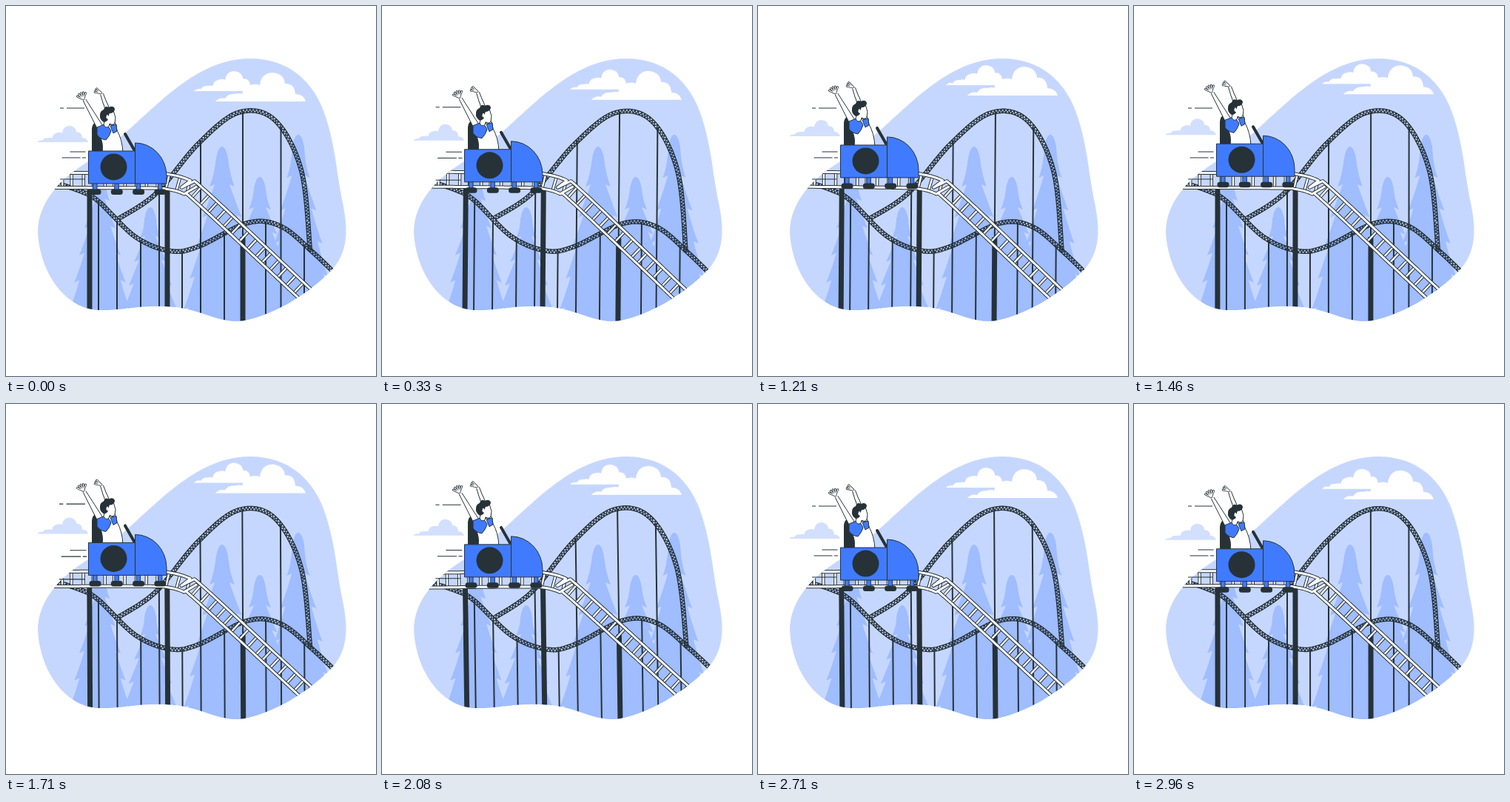
Recreate the animation shown at these times as an HTML page with a canvas. Size 500 by 500 pixels, loop 3 s.

```html
<!DOCTYPE html>
<html lang="en">
<head>
<meta charset="utf-8">
<title>Roller coaster</title>
<style>
html, body { margin: 0; width: 100%; height: 100%; overflow: hidden; background: #fff; }
canvas { display: block; width: 500px; height: 500px; }
</style>
</head>
<body>
<canvas id="stage"></canvas>
<script>
const LOOP = 3000;
const BLUE = '#407bff', PALE = '#c6d7ff', MID = '#9fbdff', MIST = '#d2dfff',
  DARK = '#263238', WHITE = '#fff';

const canvas = document.getElementById('stage');
const ratio = window.devicePixelRatio || 1;
canvas.width = canvas.height = 500 * ratio;
const ctx = canvas.getContext('2d');

function fill(path, color) {
  ctx.fillStyle = color;
  ctx.fill(path);
}

function stroke(path, color, width) {
  ctx.strokeStyle = color;
  ctx.lineWidth = width;
  ctx.stroke(path);
}

function shape(path, color, width = 1) {
  fill(path, color);
  stroke(path, DARK, width);
}

// A light line with a dark edge on both sides.
function tube(path, width, edge) {
  stroke(path, DARK, width + 2 * edge);
  stroke(path, WHITE, width);
}

// Smooth curve through points, resampled at an even step, with normals.
function curve(pts, step) {
  const at = i => pts[Math.max(0, Math.min(pts.length - 1, i))];
  const mix = (a, b, c, d, u) => 0.5 * (2 * b + (c - a) * u +
    (2 * a - 5 * b + 4 * c - d) * u * u + (3 * b - a - 3 * c + d) * u * u * u);
  const out = [];
  let prev = pts[0], left = 0;
  for (let i = 0; i < pts.length - 1; i++) {
    const q = [at(i - 1), at(i), at(i + 1), at(i + 2)];
    for (let k = 1; k <= 60; k++) {
      const p = [0, 1].map(n => mix(q[0][n], q[1][n], q[2][n], q[3][n], k / 60));
      const dx = p[0] - prev[0], dy = p[1] - prev[1], len = Math.hypot(dx, dy);
      left -= len;
      if (left <= 0) {
        out.push({ x: p[0], y: p[1], nx: -dy / len, ny: dx / len });
        left += step;
      }
      prev = p;
    }
  }
  return out;
}

// Path beside a curve; side(i) gives the distance at sample i.
function beside(points, side) {
  const path = new Path2D();
  points.forEach((p, i) => path.lineTo(p.x + p.nx * side(i), p.y + p.ny * side(i)));
  return path;
}

const blob = new Path2D(
  'M330 71C382 71 417 102 432 150C446 194 446 222 455 266C462 300 464 333 438 359' +
  'C410 387 366 416 322 425C284 430 266 408 216 406C178 404 160 411 126 411' +
  'C79 409 46 360 43 306C43 262 78 231 108 212C143 191 174 159 207 130' +
  'C244 98 282 71 330 71Z');

// Tiered tree, widening towards the ground.
function tree(x, top, half, tiers = 5) {
  const path = new Path2D(), height = 410 - top;
  for (const side of [-1, 1]) {
    path.moveTo(x, top);
    path.quadraticCurveTo(x + side * 5, top, x + side * 8, top + 16);
    for (let i = 1; i <= tiers + 1; i++) {
      const d = (i + 0.3) / (tiers + 0.3), w = half * Math.pow(d, 0.8), y = top + height * d;
      path.quadraticCurveTo(x + side * (w - 6), y - 14, x + side * w, y);
      path.lineTo(x + side * (w - 7), y - 3);
    }
    path.lineTo(x, 430);
  }
  return path;
}

const trees = [tree(127, 216, 41), tree(195, 272, 36, 4), tree(292, 190, 52),
  tree(343, 231, 46), tree(395, 174, 48)];

// Background lattice tracks.
const low = [[60, 237], [100, 250], [125, 264], [175, 312], [222, 331], [260, 325],
  [327, 293], [372, 298], [416, 334], [450, 367]];
const high = [[151, 288], [202, 254], [260, 186], [314, 144], [363, 154], [399, 222], [411, 331]];
const lattices = [low, high].map(pts => {
  const fine = curve(pts, 2.2);
  return { fine, lines: [() => 2.6, () => -2.6, i => i % 2 ? 2.6 : -2.6].map(s => beside(fine, s)) };
});

// Thin poles hang from a lattice, so their tops follow from x.
const poles = new Path2D();
[[125, 150, 182, 238, 295, 351, 403], [207, 263, 320, 371.5]].forEach((xs, n) => xs.forEach(x => {
  const top = lattices[n].fine.find(p => p.x >= x).y;
  poles.rect(x - 1, top, 2, 440 - top);
}));
const pillars = new Path2D();
[[113, 246], [218, 246], [320, 312]].forEach(([x, y]) => pillars.rect(x - 3.5, y, 7, 440 - y));

// Front ladder track.
const ladder = [[30, 235.5], [190, 236], [222, 238], [245, 245], [264, 258], [404, 389], [445, 427]];
const rails = [10, -10].map(d => beside(curve(ladder, 3), () => d));
const rungs = new Path2D();
curve(ladder, 14.5).forEach(p => {
  rungs.moveTo(p.x + p.nx * 9, p.y + p.ny * 9);
  rungs.lineTo(p.x - p.nx * 9, p.y - p.ny * 9);
});

// One puffy outline, stretched to each cloud's box.
const puff = new Path2D(
  'M0 0Q5 -6 13 -4Q17 -11 27 -10Q32 -12 36 -10Q38 -19 44 -21Q53 -25 60 -22' +
  'Q62 -39 78 -39Q93 -37 94 -24Q107 -25 108 -10Q119 -10 122 0Z');

function cloud(x, base, width, height) {
  const path = new Path2D();
  path.addPath(puff, new DOMMatrix([width / 122, 0, 0, height / 39, x, base]));
  return path;
}

const skyClouds = [cloud(254, 115, 86, 27), cloud(283, 129, 122, 39)];
const sideCloud = cloud(42, 184, 69, 22);

// Tapered limb between two joints.
function limb(x0, y0, w0, x1, y1, w1) {
  const a = Math.atan2(y1 - y0, x1 - x0), nx = -Math.sin(a) / 2, ny = Math.cos(a) / 2;
  const path = new Path2D();
  path.moveTo(x0 + nx * w0, y0 + ny * w0);
  path.lineTo(x1 + nx * w1, y1 + ny * w1);
  path.lineTo(x1 - nx * w1, y1 - ny * w1);
  path.lineTo(x0 - nx * w0, y0 - ny * w0);
  return path;
}

// Fingers fan out from the palm between two angles, in degrees.
function hand(x, y, from, to, count) {
  const path = new Path2D();
  for (let i = 0; i < count; i++) {
    const a = (from + (to - from) * i / (count - 1)) * Math.PI / 180;
    path.moveTo(x, y);
    path.lineTo(x + 9 * Math.cos(a), y + 9 * Math.sin(a));
  }
  return path;
}

const torso = new Path2D('M130 168Q133 162 142 160Q149 160 150 168Q157 180 158 198H130Q132 187 127 176Z');
const arms = [limb(129.5, 119, 4, 134, 132, 5), limb(134, 131, 5, 145.5, 164, 8),
  limb(106, 127, 4, 130, 169, 9)];
const hands = [hand(104.5, 126, 205, 290, 5), hand(129, 118, 190, 225, 3)];
const nearSleeve = new Path2D('M123 164L133 160Q140 163 142 169Q140 176 135 181Q127 180 123 174Z');
const farSleeve = new Path2D('M141 162L149 160L150 169L145 172Z');
const face = new Path2D('M136 146Q141 138 145 141L148 151L147 158Q145 162 140 159L139 163Q134 166 132 160Z');
const hair = new Path2D(
  'M132 157Q126 153 127 147Q127 142 132 140Q134 134 139 137Q145 134 147 139' +
  'Q147 143 142 145Q139 144 139 149Q136 145 135 149Q135 152 138 153Q137 156 132 157Z');
const seat = new Path2D('M116 198V166Q117 158 121 158Q127 162 130 176V198Z');

const grip = new Path2D('M161 173L173 194');
const body = new Path2D('M111.5 196H174.5V240H111.5Z');
const nose = new Path2D('M174.5 185A42.5 45 0 0 1 217 230V240H174.5Z');
const badge = new Path2D();
badge.arc(145.5, 217.5, 18, 0, Math.PI * 2);
const stems = new Path2D(), wheels = new Path2D();
for (let i = 0; i < 4; i++) {
  const x = 120.5 + 29.3 * i;
  stems.rect(x - 3, 239, 5.5, 10);
  wheels.roundRect(x - 8, 247.5, 16, 7.5, 3.5);
}

const streaks = new Path2D(
  'M73 138h5M82 138h24M86.5 197h21M75.5 205h25M103 205h5M73 234h33');

// Motion as a function of loop progress, 0 to 1.
const hat = (t, mid, reach) => Math.max(0, 1 - Math.abs(t - mid) / reach);
const rise = t => -10 * hat(t, 0.5, 0.5);
const sway = t => Math.asin(Math.sin(2 * Math.PI * t)) / 90;
const beat = t => 1 + 0.06 * (hat(t, 0.14, 0.14) + hat(t, 0.46, 0.2));

// Draws about a fixed centre, turned and scaled.
function about(x, y, angle, scale, draw) {
  ctx.save();
  ctx.translate(x, y);
  ctx.rotate(angle);
  ctx.scale(scale, scale);
  ctx.translate(-x, -y);
  draw();
  ctx.restore();
}

function lifted(dy, draw) {
  ctx.save();
  ctx.translate(0, dy);
  draw();
  ctx.restore();
}

function drawTracks() {
  fill(poles, DARK);
  lattices.forEach(l => l.lines.forEach(line => stroke(line, DARK, 1.3)));
  fill(pillars, DARK);
  tube(rungs, 2.4, 1);
  rails.forEach(r => tube(r, 3, 1));
}

function drawRider() {
  fill(seat, DARK);
  ctx.lineCap = 'round';
  hands.forEach(h => tube(h, 1.2, 0.8));
  ctx.lineCap = 'butt';
  shape(arms[0], WHITE);
  shape(arms[1], WHITE);
  shape(torso, WHITE);
  shape(farSleeve, BLUE);
  shape(arms[2], WHITE);
  shape(nearSleeve, BLUE);
  shape(face, WHITE);
  fill(hair, DARK);
}

function drawCar() {
  ctx.lineCap = 'round';
  stroke(grip, DARK, 4);
  ctx.lineCap = 'butt';
  shape(stems, BLUE);
  fill(wheels, DARK);
  shape(body, BLUE);
  shape(nose, BLUE);
  fill(badge, DARK);
}

function render(ms) {
  const t = ms % LOOP / LOOP, dy = rise(t);
  ctx.setTransform(ratio, 0, 0, ratio, 0, 0);
  ctx.lineJoin = 'round';
  ctx.fillStyle = WHITE;
  ctx.fillRect(0, 0, 500, 500);
  fill(blob, PALE);

  ctx.save();
  ctx.clip(blob);
  trees.forEach(p => fill(p, MID));
  about(255, 283, sway(t), 1, drawTracks);
  ctx.restore();

  lifted(dy, () => {
    fill(sideCloud, MIST);
    skyClouds.forEach(c => fill(c, WHITE));
  });
  about(90, 186, 0, beat(t * 2 % 1), () => stroke(streaks, DARK, 1));
  lifted(dy, () => {
    drawRider();
    drawCar();
  });
}

const start = performance.now();
function tick() {
  render(performance.now() - start);
  requestAnimationFrame(tick);
}
tick();
</script>
</body>
</html>
```
